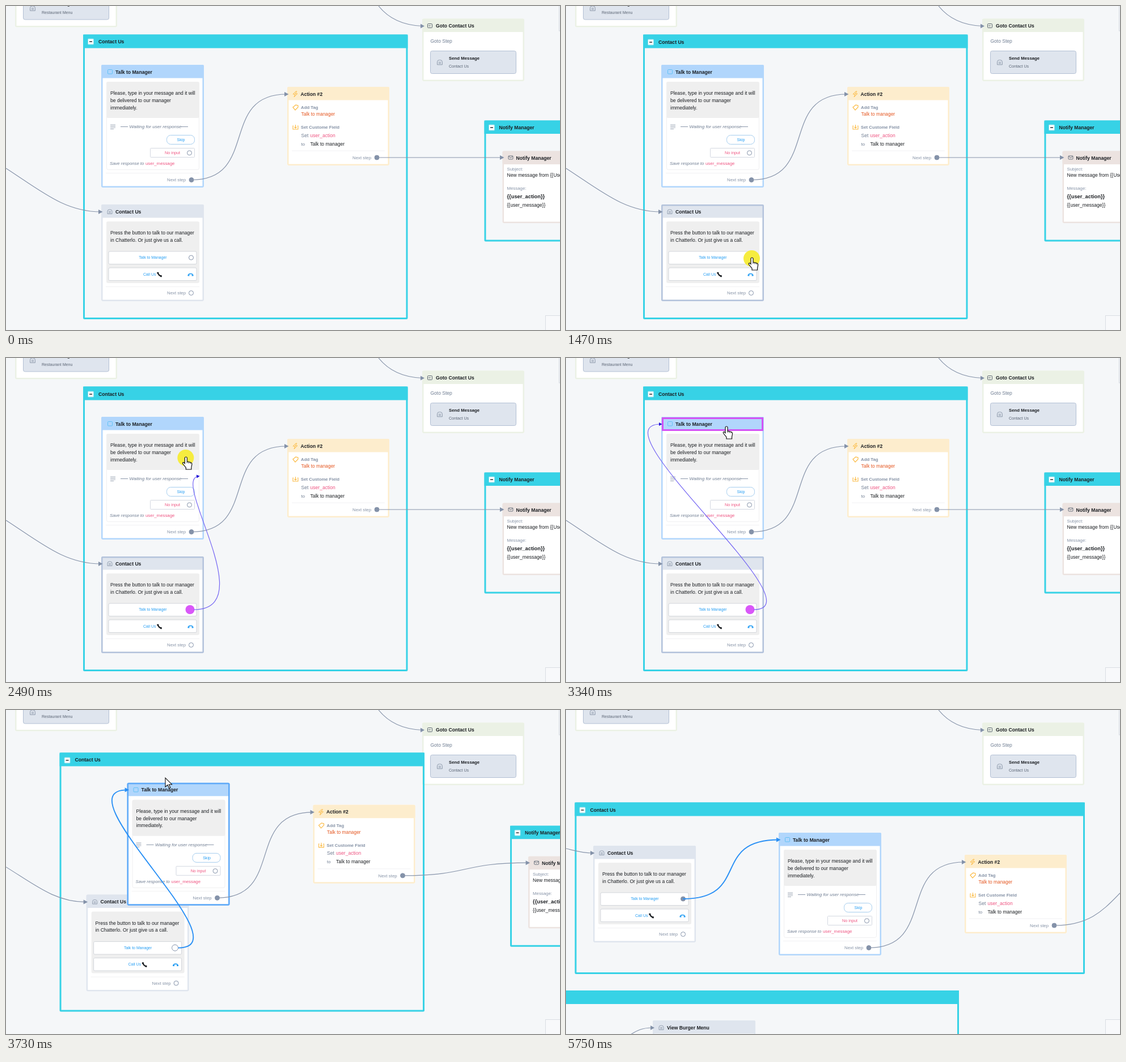
An HTML page for the animation above (6300 ms loop, 977 px wide and 573 px high).

```html
<!DOCTYPE html>
<html lang="en">
<head>
<meta charset="utf-8">
<title>Flow builder</title>
<style>
  html, body { margin: 0; width: 100%; height: 100%; overflow: hidden; background: #f5f7f9; }
  svg { display: block; width: 100%; height: 100%; }
  text { font-family: "Liberation Sans", Arial, sans-serif; }
  .b { font-weight: bold; }
  .i { font-style: italic; }
  .m { text-anchor: middle; }
  .edge { fill: none; stroke: #8794aa; stroke-width: 1.2; }
  #linkEdge { stroke: #2a90f5; stroke-width: 1.9; }
  #drag { stroke: #7465f3; }
</style>
</head>
<body>
<svg id="stage" viewBox="0 0 977 573" preserveAspectRatio="none"></svg>
<script>
const LOOP = 6300;
const REACH = 120; // length of the horizontal handles of every connector
const INK = '#1b1e22', GRAY = '#8592a6', SLATE = '#8492a9', MUTED = '#6f7d92', BLUE = '#249df3', PINK = '#ee5380',
      CYAN = '#37d2e6', STEEL = '#dfe5ee', SKY = '#b1d6fc', AMBER = '#fbbb45';

// Markup helpers
const text = (x, y, str, size = 8.56, fill = INK, cls = '') =>
  `<text x="${x}" y="${y}" font-size="${size}" fill="${fill}" class="${cls}">${str}</text>`;
const rect = (x, y, w, h, fill, stroke = 'none', rx = 0, sw = 1) =>
  `<rect x="${x}" y="${y}" width="${w}" height="${h}" rx="${rx}" fill="${fill}" stroke="${stroke}" stroke-width="${sw}"/>`;
const dot = (x, y, fill = '#fff', r = 4) =>
  `<circle cx="${x}" cy="${y}" r="${r}" fill="${fill}" stroke="${SLATE}"/>`;
const line = (d, color, width = 1, fill = 'none') =>
  `<path d="${d}" fill="${fill}" stroke="${color}" stroke-width="${width}"/>`;
const at = (x, y, body, scale = 1) => `<g transform="translate(${x} ${y}) scale(${scale})">${body}</g>`;
const group = (id, body) => `<g id="${id}">${body}</g>`;

const frame = (w, h, color) => rect(1.25, 1.25, w - 2.5, h - 2.5, 'none', color, 1.5, 2.5);
const node = (w, h, color, title, body, titleX = 25) =>
  rect(0, 0, w, h, '#fff', 'none', 2) + frame(w, h, color) + rect(0, 0, w, 23.5, color, 'none', 2) +
  text(titleX, 15.5, title, 8.6, INK, 'b') + body;
const minus = rect(0, 0, 10, 10, '#fff', '#8adfe9', 1) + line('M2.5 5h5', INK, 1.4);
const bubble = line('M.5 8V3.5Q.5 .5 4 .5h1Q8.5 .5 8.5 3.5V8zM2.5 4h4M2.5 6h4', '#8d99ab', .9);
const divider = (y, w) => line(`M8 ${y}h${w - 16}`, '#f1f1f3');

const handset = line('M-3-3C-3 0 0 3 3 3', INK, 2.2) + line('M-3.2-3.8v2.6M1.2 3.2h2.6', INK, 3);
const callIcon = line('M-4 1.5C-4-2.5 4-2.5 4 1.5', BLUE, 1.6) + line('M-5 1.5h3M2 1.5h3', BLUE, 2);

const talk = node(181, 217, SKY, 'Talk to Manager',
  rect(9.5, 30.5, 163, 155, '#fff', '#efeff1', 3) + rect(9, 30, 164, 64, '#efefef', 'none', 3) +
  rect(11.5, 8.5, 8, 7.5, 'none', '#62c1f5', 1) +
  text(16, 53, 'Please, type in your message and it will') +
  text(16, 65.8, 'be delivered to our manager') + text(16, 78.5, 'immediately.') +
  line('M16 106h9M16 108.5h9M16 111h9M16 113.5h6', '#a4adba') +
  line('M34 109.5h13M141 109.5h12', '#8b97aa') +
  text(49.5, 112, 'Waiting for user response', 8.1, MUTED, 'i') +
  rect(115.5, 124.5, 49, 16, '#fff', '#a5cdee', 7) + text(140.5, 135, 'Skip', 7.1, BLUE, 'm') +
  rect(86.5, 147.5, 78, 16, '#fff', '#d3d8e1', 1) + text(125.5, 158, 'No input', 7.2, PINK, 'm') + dot(155.5, 155.8) +
  text(15, 177, 'Save response to', 7.75, MUTED, 'i') + text(78, 177, 'user_message', 7.85, PINK) +
  divider(191.5, 181) + text(116, 206, 'Next step', 7.84, GRAY) + dot(159, 203.5, SLATE));

const button = y => rect(13, y, 155, 22.5, '#fff', '#d3d6db', 2);
const contact = node(181, 171, STEEL, 'Contact Us',
  at(10.5, 8.5, bubble) + rect(9, 30, 164, 109, '#efefef', 'none', 3) +
  text(16, 53, 'Press the button to talk to our manager') +
  text(16, 65.5, 'in Chatterlo. Or just give us a call.') +
  button(83) + text(91, 96, 'Talk to Manager', 6.95, BLUE, 'm') +
  button(112) + text(74, 125.5, 'Call Us', 6.95, BLUE) + at(103, 123.5, handset) + at(157.5, 124, callIcon) +
  divider(145.5, 181) + text(116, 159, 'Next step', 7.84, GRAY) + dot(158.5, 156.5) +
  group('buttonHover', rect(13, 83, 155, 22.5, 'none', '#2c93ea', 2, 2)) +
  group('contactHover', frame(181, 171, '#b4c3dc')) +
  '<circle id="port" cy="94"/>');

const action = node(180, 139, '#fdedcd', 'Action #2',
  line('M15 8l-5 5h4l-2 5 6-6h-4l3-4z', AMBER) +
  line('M10 36l5-4 4 1 0 3-5 5z', AMBER, 1.2) + text(24, 39, 'Add Tag', 7.8, GRAY, 'b') +
  text(24.5, 51, 'Talk to manager', 8.4, '#e4551f') +
  line('M11 69h-1v6h9v-6h-1M14.5 67v5M12.5 71l2 2 2-2', AMBER, 1.1) +
  text(24, 74, 'Set Custome Field', 7.8, GRAY, 'b') +
  text(24.5, 88.5, 'Set', 8.5, MUTED) + text(40.5, 88.5, 'user_action', 8.56, PINK) +
  text(24.5, 103.5, 'to', 7.84, MUTED) + text(40.5, 103.5, 'Talk to manager', 8.5) +
  divider(113, 180) + text(115, 128, 'Next step', 7.84, GRAY) + dot(158, 125, SLATE), 23.5);

const goto = step => node(180, 110.5, '#ebf1e5', 'Goto Contact Us',
  rect(9.5, 9, 8, 7, 'none', '#59636f', 1) + line('M11 12.5h4', '#59636f') +
  text(14.5, 42.5, 'Goto Step', 8.5, MUTED) + rect(14.5, 57, 151, 40, STEEL, '#b3c0d4', 3) +
  at(26, 72.5, bubble, 1.1) + text(47, 72, 'Send Message', 7.8, INK, 'b') +
  text(47, 86.5, step, 7.1, '#5c6675'), 24);

const notify = rect(1.5, 1.5, 250, 211, 'none', CYAN, 1, 3) + rect(0, 0, 250, 23.5, CYAN) +
  at(8, 7.5, minus) + text(26, 15.5, 'Notify Manager', 8.6, INK, 'b') +
  at(32, 54, node(181, 127.5, '#ece3e0', 'Notify Manager',
    rect(10.5, 8.5, 8, 6, 'none', '#6b737e', 1) + line('M10.5 9l4 3 4-3', '#6b737e') +
    text(8, 34.5, 'Subject:', 7.84, GRAY) + text(8, 45.5, 'New message from {{User Name}}') +
    text(8, 68.5, 'Message:', 7.84, GRAY) + text(8, 83, '{{user_action}}', 9.3, INK, 'b') +
    text(8, 98, '{{user_message}}', 8.6), 24));

const burger = rect(-20, 1.5, 711.5, 200, 'none', CYAN, 1, 3) + rect(-20, 0, 713, 24, CYAN) +
  at(153, 53, node(181, 170, STEEL, 'View Burger Menu', at(10.5, 8.5, bubble))) +
  line('M108 82C125 70 135 66 152 66', '#8794aa', 1.2) + line('M149 62l7 4-7 4z', 'none', 0, SLATE);

const edge = id => `<path id="${id}" class="edge"/><path id="${id}Tip" d="M-4-4l7.5 4-7.5 4z" fill="${SLATE}"/>`;
const hand = line('M-2 2a2 2 0 0 1 4 0v6l6 1.5q3 1 2.5 4l-1 5v3.5h-9.5v-3l-5.5-7q-1-2.5 1.5-2.5l2 2z', '#111', 1.2, '#fff') +
  line('M2 8v3M5 9v2.5M8 10v2', '#111', .9);
const arrow = line('M0 0V16l4-3.5 2.7 6 2.3-1-2.6-5.8H11.5z', '#111', 1.1, '#fff');

stage.innerHTML =
  at(16, -73, goto('Restaurant Menu')) + at(734, 22.5, goto('Contact Us')) +
  rect(975.5, -5, 20, 49, 'none', '#d3d8df') + rect(951.5, 547.5, 60, 60, '#f8f9fb', '#d9dde3') +
  line('M657 0C669 15 692 34 734 35.5', '#8794aa', 1.2) + line('M731 31.5l7 4-7 4z', 'none', 0, SLATE) +
  group('burger', burger) +
  `<rect id="boxFrame" fill="none" stroke="${CYAN}" stroke-width="3" rx="1"/><rect id="boxHead" height="24" fill="${CYAN}"/>` +
  group('boxLabel', at(8.5, 7.5, minus) + text(27, 15, 'Contact Us', 8.6, INK, 'b')) +
  group('notify', notify) + group('contact', contact) +
  group('talk', talk + group('talkSelected', frame(181, 217, '#60aaf8')) +
    group('talkTarget', rect(2.5, 2.5, 176, 21, 'none', '#d453f4', 0, 3))) +
  group('action', action) +
  ['inEdge', 'talkEdge', 'actionEdge', 'linkEdge', 'drag'].map(edge).join('') +
  group('pointer', '<circle id="press" cx="-.5" cy="1.5" r="14.5" fill="#f6ec3f"/>' + group('hand', hand) + group('arrow', arrow));

const el = id => document.getElementById(id);
const set = (id, attrs) => { for (const k in attrs) el(id).setAttribute(k, attrs[k]); };
const show = (id, on) => set(id, { visibility: on ? 'visible' : 'hidden' });
const move = (id, x, y) => set(id, { transform: `translate(${x} ${y})` });

set('linkEdgeTip', { fill: '#2a90f5' });
set('dragTip', { fill: '#2415d6' });

// Linear interpolation through [position, ...values] keys
function track(keys, v) {
  const n = keys.findIndex(k => k[0] > v);
  if (n === 0) return keys[0].slice(1);
  if (n < 0) return keys.at(-1).slice(1);
  const a = keys[n - 1], b = keys[n], p = (v - a[0]) / (b[0] - a[0]);
  return a.slice(1).map((x, i) => x + (b[i + 1] - x) * p);
}

// Screen updates come in bursts: [first, last, count]
const BURSTS = [[150, 770, 9], [840, 1470, 9], [1630, 2250, 9], [2330, 2650, 5],
                [3340, 3420, 2], [3570, 3730, 3], [3960, 4200, 4], [5620, 5750, 3]];
function snap(t) {
  const burst = BURSTS.findLast(b => b[0] <= t);
  if (!burst) return 0;
  const [first, last, count] = burst, gap = (last - first) / (count - 1);
  return first + Math.min(count - 1, Math.floor((t - first) / gap + .001)) * gap;
}

const POINTER = [[150, 715, 470], [310, 560, 455], [540, 385, 447], [770, 328, 444], [1470, 328, 445],
  [1630, 334, 446], [1785, 370, 442], [1940, 387, 423], [2017, 397, 374], [2250, 380, 272],
  [2330, 362, 245], [2570, 295, 140], [2650, 283, 121], [3340, 283, 121], [3420, 281, 120]];
const SLIDE = [[3490, 0], [3570, .02], [3650, .092], [3730, .22], [3960, .5], [4040, .77], [4120, .93], [4200, 1]];
const BOX = [[0, 136, 50.5, 708.5, 554], [.092, 107.5, 61, 709, 544.5], [1, 15.5, 163.5, 915, 467]];

function curve(id, [x, y], [dx1, dy1], [dx2, dy2], [tx, ty], angle = 0, tipScale = 1) {
  set(id, { d: `M${x} ${y}C${x + dx1} ${y + dy1} ${tx + dx2} ${ty + dy2} ${tx} ${ty}` });
  set(id + 'Tip', { transform: `translate(${tx} ${ty}) rotate(${angle}) scale(${tipScale})` });
}
const connect = (id, from, to) => curve(id, from, [REACH, 0], [-REACH, 0], to);

function draw(time) {
  const t = snap(time), [p] = track(SLIDE, t);
  const tx = 168 + 207 * p, ty = 104 + 113 * p, cx = 168 - 120 * p, cy = 351 - 111 * p;
  const ax = 496 + 207 * p, ay = 143 + 113 * p, nx = 843.5 + 207 * p, ny = 202.5 + 10 * p;
  move('talk', tx, ty); move('contact', cx, cy); move('action', ax, ay); move('notify', nx, ny);
  move('burger', 0, 496 + 120 * (1 - p));

  const [l, top, r, bottom] = track(BOX, p);
  set('boxFrame', { x: l + 1.5, y: top + 1.5, width: r - l - 3, height: bottom - top - 3 });
  set('boxHead', { x: l, y: top, width: r - l });
  move('boxLabel', l, top + (t < 1470 ? 0 : 1));

  const [inY] = track([[0, 287], [.092, 283], [1, 245]], p), inX = cx - 1, dy = cy + 13 - inY;
  curve('inEdge', [0, inY], [inX * .37, dy * .52], [-inX * .38, 0], [inX, cy + 13]);
  connect('talkEdge', [tx + 159, ty + 203.5], [ax - 1, ay + 13]);
  connect('actionEdge', [ax + 158, ay + 125], [nx + 31.5, ny + 65.5]);

  const linked = t >= 3570, dragging = t >= 1630 && !linked, grabbed = t >= 1240 && !linked, settled = t >= 4200;
  for (const id of ['linkEdge', 'linkEdgeTip']) show(id, linked);
  for (const id of ['drag', 'dragTip']) show(id, dragging);
  connect('linkEdge', [cx + (settled ? 158 : 162), cy + 94], [tx, ty + 12.5]);

  const end = t >= 2650 ? [167, 117] : track(POINTER, t - 78);
  const [bx, by] = track([[2250, 59, 17], [2650, -REACH, 0]], t);
  curve('drag', [331, 445], [REACH, 0], [bx, by], end, Math.atan2(-by, -bx) * 180 / Math.PI, .75);

  set('port', grabbed ? { cx: 156.5, r: 8, fill: '#d957f8', stroke: 'none' }
    : { cx: linked && !settled ? 156.5 : 158.5, r: linked && !settled ? 5.5 : 4, fill: settled ? SLATE : '#fff', stroke: SLATE });
  show('buttonHover', t >= 690 && t < 1240);
  show('contactHover', t >= 600 && !linked);
  show('talkTarget', t >= 2570 && !linked);
  show('talkSelected', linked && t < 4120);

  const [px, py] = track(POINTER, t), handOn = t >= 690 && t < 3420;
  move('pointer', px, py);
  set('pointer', { opacity: t < 150 ? 0 : track([[5555, 1], [5750, 0]], t)[0] });
  show('hand', handOn); show('arrow', !handOn);
  show('press', t >= 1240 && t < 3340);
}

const start = performance.now();
function tick() {
  draw((performance.now() - start) % LOOP);
  requestAnimationFrame(tick);
}
tick();
</script>
</body>
</html>
```
